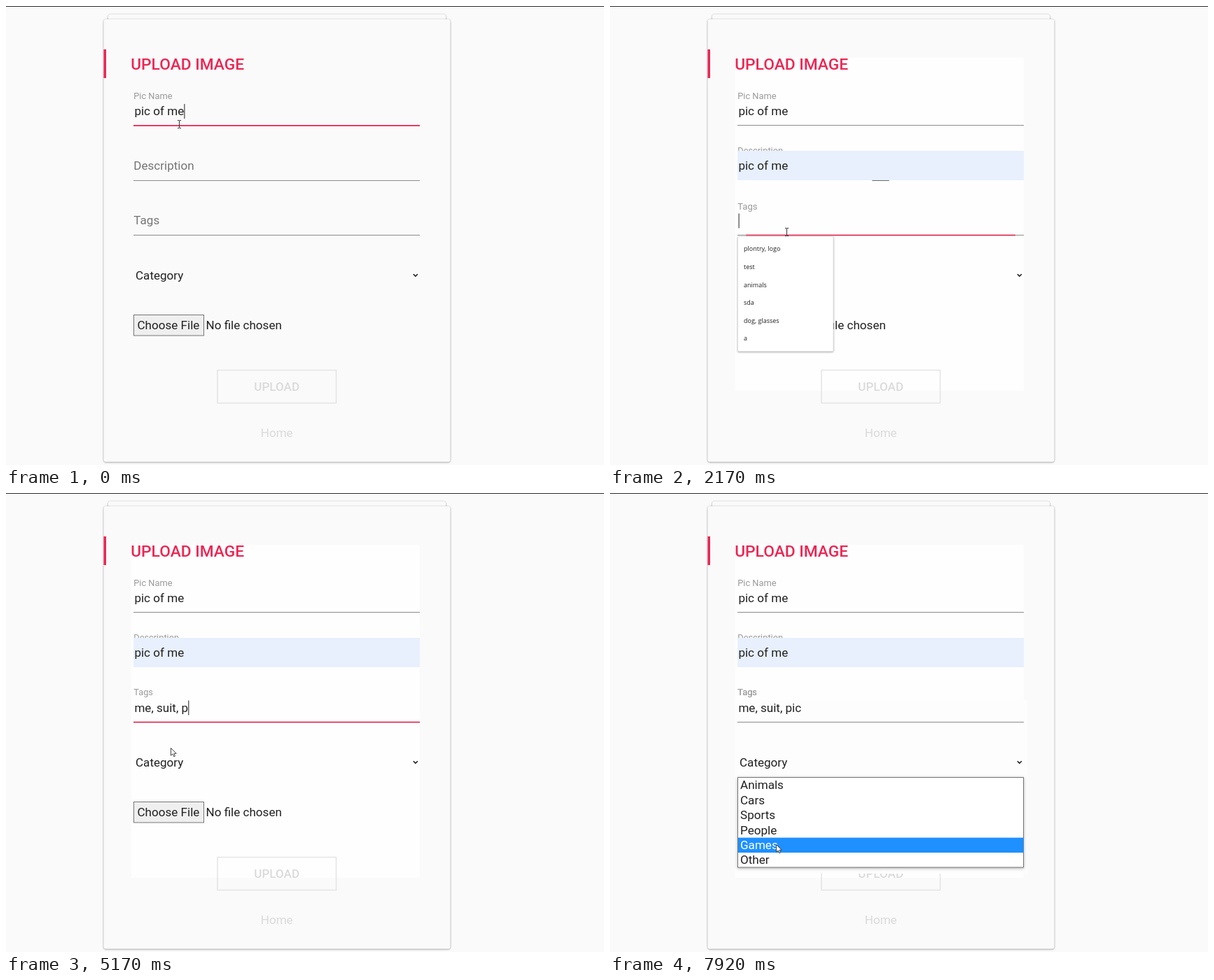
Recreate the animation shown at these times as an HTML page. Size 854 by 656 pixels, loop 8000 ms.

```html
<!DOCTYPE html>
<html lang="en">
<head>
<meta charset="utf-8">
<title>Upload form</title>
<style>
  html, body { margin: 0; width: 100%; height: 100%; overflow: hidden; background: #fafafa; }
  svg { display: block; width: 854px; height: 656px; }
  text { font: 17.07px Roboto, sans-serif; fill: #212121; white-space: pre; }
  .title { font-size: 22.75px; font-weight: 500; fill: #ed2553; }
  .hint { fill: #757575; }
  .off { fill: #dadada; }
  .strong { font-weight: 500; }
  .item { font: 9px "Open Sans", sans-serif; }
  .preview { font: 9.5px "Liberation Sans", Arial, sans-serif; fill: #000; }
  .card { fill: #fafafa; filter: drop-shadow(0 1px 1px rgba(0, 0, 0, .24)) drop-shadow(0 0 1px rgba(0, 0, 0, .2)); }
  .popup { fill: #fff; stroke: #dcdcdc; filter: drop-shadow(0 1px 1px rgba(0, 0, 0, .3)); }
  .menu { fill: #fff; stroke: #767676; filter: drop-shadow(0 1px 2px rgba(0, 0, 0, .3)); }
</style>
</head>
<body>
<svg id="stage" viewBox="0 0 854 656"></svg>
<script>
const LOOP = 8000, LEFT = 182, RIGHT = 591, TEXT_X = 183.4;
const RED = '#ed2553', GREY = '#8c8c8c', BLUE = '#e8f0fe';
const stage = document.getElementById('stage');
const pen = document.createElement('canvas').getContext('2d');

// Screen updates come in bursts: [first, last, count]
const bursts = [[400, 1330, 8], [1450, 1690, 3], [1930, 2410, 5], [2530, 2830, 3], [3140, 3710, 5],
  [3980, 4770, 6], [5170, 5170, 1], [5450, 5700, 2], [6260, 6260, 1], [6690, 7230, 5],
  [7380, 7680, 3], [7800, 7920, 2]];
const ticks = [0];
for (const [a, b, n] of bursts)
  for (let i = 0; i < n; i++) ticks.push(Math.round(n > 1 ? a + (b - a) * i / (n - 1) : a));

const pointer = [[400, 247.5, 169], [760, 240, 230], [931, 240, 231], [1330, 229, 274], [1450, 229, 295],
  [1690, 230, 297], [2050, 252.5, 323], [2410, 252.5, 323], [2530, 249, 340], [2830, 235, 364],
  [6600, 235, 364], [7230, 227, 381], [7380, 227, 381], [7530, 231, 430], [7680, 236, 480], [7920, 237, 502]];

const typing = [[0, ''], [3710, 's'], [3980, 'm'], [4130, 'me'], [4290, 'me, '], [4450, 'me, s'],
  [4610, 'me, sui'], [4770, 'me, suit, '], [5170, 'me, suit, p'], [5450, 'me, suit, pi'], [5700, 'me, suit, pic']];

const descItems = ['Plontry logo', 'pic of me', 'bunch o animals', 'test', 'dog with glasses', 'a'];
const tagItems = ['plontry, logo', 'test', 'animals', 'sda', 'dog, glasses', 'a'];
const categories = ['Animals', 'Cars', 'Sports', 'People', 'Games', 'Other'];

const within = (t, a, b) => t >= a && t < b;
const ease = (t, start, span) => 1 - (1 - Math.min(1, Math.max(0, (t - start) / span))) ** 2;
const lastAt = (list, t) => list.filter(e => e[0] <= t).pop();

const rect = (x, y, w, h, fill, extra = '') =>
  `<rect x="${x}" y="${y}" width="${w}" height="${h}" fill="${fill}" ${extra}/>`;
const label = (x, y, s, cls = '', extra = '') => `<text x="${x}" y="${y}" class="${cls}" ${extra}>${s}</text>`;

function rule(y, color, part = 1, h = 1) {
  const w = (RIGHT - LEFT) * part;
  return part > 0 ? rect((LEFT + RIGHT - w) / 2, y, w, h, color) : '';
}

function caret(s, y) {
  pen.font = '17.07px Roboto, sans-serif';
  return rect(TEXT_X + pen.measureText(s).width + .2, y, 1, 21, '#212121');
}

// Field label that shrinks and rises as p goes from 0 to 1
function floating(s, base, p) {
  const shade = Math.round(117 + 36 * p);
  return label(182.3, base - 23 * p, s, '',
    `style="font-size:${17.07 * (1 - .25 * p)}px;fill:rgb(${shade},${shade},${shade})"`);
}

function suggestions(y, items, hover) {
  const row = 25.65;
  let out = `<rect class="popup" x="182.5" y="${y}" width="136.5" height="${items.length * row + 10.5}" rx="1.5"/>`;
  items.forEach((s, i) => {
    const top = y + 5 + i * row;
    if (i === hover) out += rect(183, top, 136, row, '#c8c8c8');
    out += label(191, top + 16, s, 'item');
  });
  return out;
}

function categoryMenu(hover) {
  const row = 21.4;
  let out = rect(178, 296, 418, 248, '#fdfdfd') + field3Done() +
    '<rect class="menu" x="182.5" y="406.5" width="408" height="128.5"/>';
  categories.forEach((s, i) => {
    const top = 407 + i * row;
    if (i === hover) out += rect(183, top, 407.5, row, '#1e90ff');
    out += label(186, top + 16.3, s, '', i === hover ? 'style="fill:#fff"' : '');
  });
  return out;
}

const field3Done = () => label(TEXT_X, 313, 'me, suit, pic') + rule(327, GREY) + selectBox();

const selectBox = () => label(185, 391, 'Category') +
  '<path d="M581.8 383.2l3 3 3-3" fill="none" stroke="#111" stroke-width="1.5"/>';

function cursorAt(t) {
  const i = pointer.findIndex(p => p[0] > t);
  if (i === 0) return pointer[0].slice(1);
  if (i < 0) return pointer[pointer.length - 1].slice(1);
  const [t0, x0, y0] = pointer[i - 1], [t1, x1, y1] = pointer[i], k = (t - t0) / (t1 - t0);
  return [x0 + (x1 - x0) * k, y0 + (y1 - y0) * k];
}

function cursor(t) {
  const [x, y] = cursorAt(t);
  const beam = t < 1190 || within(t, 1930, 2530);
  return `<g transform="translate(${x} ${y})">` + (beam
    ? '<path d="M-2.5-5.5H-.6L0-5 .6-5.5H2.5M0-5V5M-2.5 5.5H-.6L0 5 .6 5.5H2.5" fill="none" stroke="#333"/>'
    : '<path d="M.5.5V11.2L3 8.9 4.8 12.8 6.5 12 4.8 8.3H8.2Z" fill="#fff" stroke="#333" stroke-width=".9"/>') + '</g>';
}

const frame = rect(0, 0, 854, 656, '#fafafa') + rect(0, 0, 854, 1, '#2a2a2a') +
  '<rect class="card" x="146" y="12" width="482" height="20" rx="3"/>' +
  '<rect class="card" x="139.5" y="19" width="495" height="632.5" rx="3"/>' +
  rect(139.5, 62, 3.5, 41, RED);

const content = label(178.2, 90.7, 'UPLOAD IMAGE', 'title') +
  rect(182.5, 441.5, 100, 29.5, '#efefef', 'stroke="#767676"') +
  label(187.5, 462, 'Choose File') + label(285.5, 462, 'No file chosen') +
  rect(302, 520.5, 169.5, 47, 'none', 'stroke="#e4e4e4" stroke-width="1.5"') +
  label(386.7, 550, 'UPLOAD', 'off strong', 'text-anchor="middle"') +
  label(386.7, 615.7, 'Home', 'off', 'text-anchor="middle"') +
  label(182.3, 132.6, 'Pic Name', '', 'style="font-size:12.8px;fill:#999"') + label(TEXT_X, 156, 'pic of me');

function nameField(t) {
  return rule(170, GREY) + rule(170, RED, 1 - ease(t, 750, 225), 1.8) + (t < 400 ? caret('pic of me', 140) : '');
}

function descField(t) {
  const on = ease(t, 750, 225), off = ease(t, 2000, 225);
  const filled = t >= 1330, chosen = t >= 1690;
  let out = floating('Description', 233.8, on);
  if (filled) out += rect(LEFT, 207, 409, 42, BLUE);
  if (!chosen) out += rule(249, GREY);
  out += rule(249, filled ? '#6a6a6a' : RED, on - off, filled ? 1 : 1.8);
  if (chosen) out += label(TEXT_X, 234.4, 'pic of me');
  else if (filled) out += label(183.5, 234.5, descItems[t < 1450 ? 0 : 1], 'preview');
  if (within(t, 799, 1690)) out += caret('', 219);
  return out;
}

function tagField(t) {
  const on = ease(t, 2000, 225), text = lastAt(typing, t)[1];
  const preview = within(t, 2530, 3710);
  let out = floating('Tags', 312.4, on);
  if (preview) {
    out += rect(LEFT, 285, 409, 42.3, BLUE) + rule(327.3, RED, 1, 1.1) +
      label(183.5, 313, tagItems[t < 2830 ? 0 : 1], 'preview');
  } else {
    out += rule(327, GREY) + rule(326.7, '#e0284f', on, 1.7) + label(TEXT_X, 313, text);
  }
  if (within(t, 2050, 2530) || within(t, 3140, 6260)) out += caret(text, 296.5);
  return out;
}

function popups(t) {
  if (within(t, 931, 1690)) return suggestions(250.8, descItems, t < 1330 ? -1 : t < 1450 ? 0 : 1);
  if (within(t, 2170, 3710)) return suggestions(329.2, tagItems, t < 2530 ? -1 : t < 2830 ? 0 : 1);
  if (within(t, 3710, 3980)) return suggestions(329.2, tagItems.filter(s => s[0] === 's' || s[0] === 'p'), -1);
  if (t >= 7380) return categoryMenu(t < 7530 ? -1 : t < 7680 ? 1 : t < 7800 ? 3 : 4);
  return '';
}

function draw(t) {
  return frame + (t >= 798 ? rect(179, 74, 412, 476, '#fefefe') : '') + content +
    nameField(t) + descField(t) + (t < 7380 ? tagField(t) + selectBox() : floating('Tags', 312.4, 1)) +
    popups(t) + (t >= 7380 ? floating('Tags', 312.4, 1) : '') + cursor(t);
}

let shown = -1;
function tick() {
  const now = performance.now() % LOOP;
  const t = ticks.filter(v => v <= now).pop();
  if (t !== shown) stage.innerHTML = draw(shown = t);
  requestAnimationFrame(tick);
}
tick();
</script>
</body>
</html>
```
